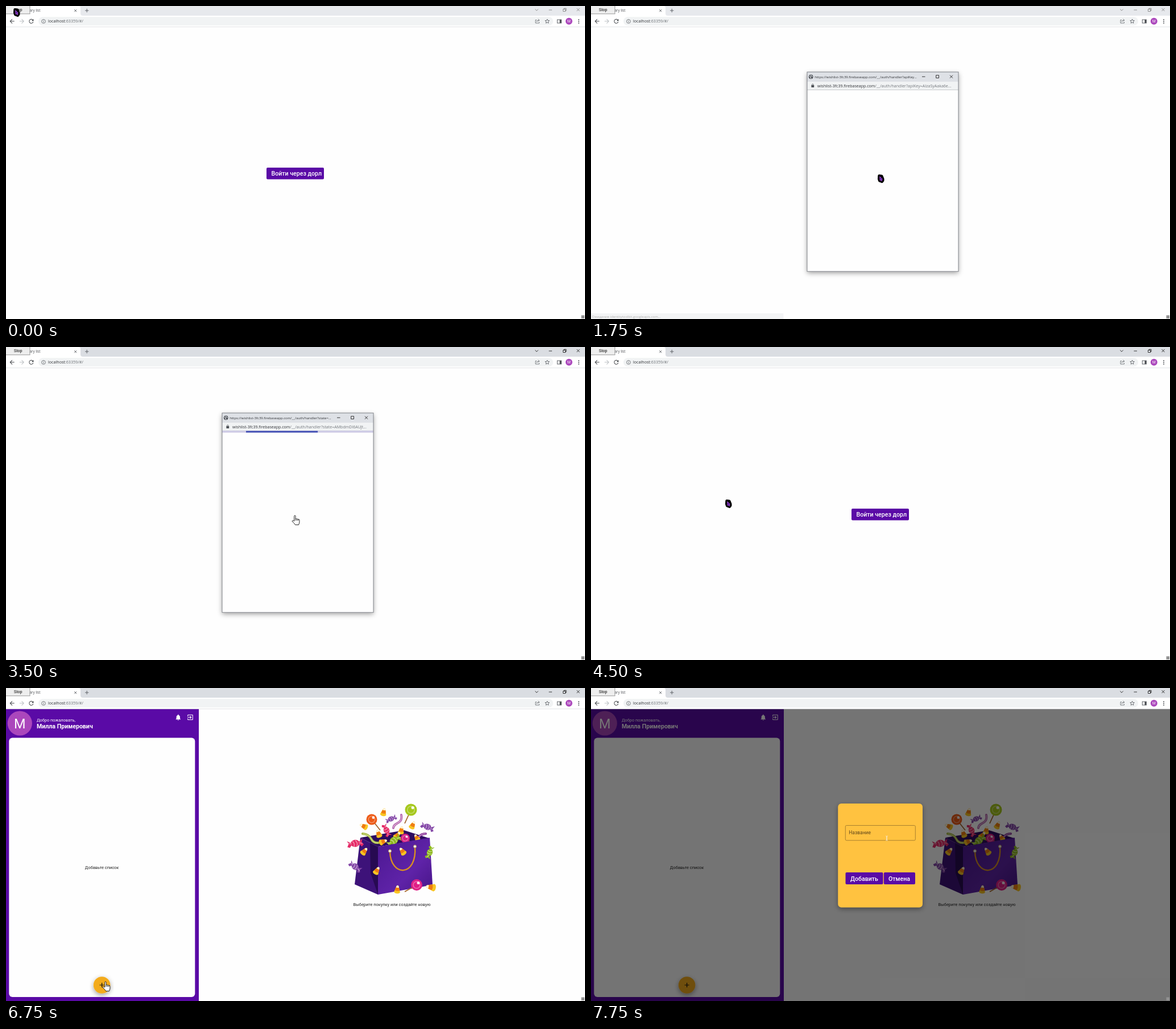
These frames come from a looping animation (1018 by 550 pixels, 8 s). An HTML page:

```html
<!DOCTYPE html>
<html lang="ru">
<head>
<meta charset="utf-8">
<title>List</title>
<style>
html, body { margin: 0; width: 100%; height: 100%; overflow: hidden; background: #fff; }
svg { display: block; width: 1018px; height: 550px; }
text { font: 7.42px Roboto, sans-serif; white-space: pre; }
.ui { font-family: "Open Sans", "Noto Sans", sans-serif; }
.btn { font-size: 10.6px; font-weight: 500; fill: #fff; }
.line { fill: none; stroke: #5f6368; }
.purple { fill: #5a0aa6; }
</style>
</head>
<body>
<svg viewBox="0 0 1018 550">
  <defs>
    <filter id="shadow" x="-20%" y="-20%" width="140%" height="140%">
      <feDropShadow dx="0" dy="3" stdDeviation="4" flood-opacity=".38"/>
    </filter>
    <linearGradient id="front" x2="1" y2="1">
      <stop stop-color="#4b1791"/><stop offset=".6" stop-color="#5f23a8"/><stop offset="1" stop-color="#461487"/>
    </linearGradient>
    <g id="corn">
      <path d="M0-8Q2-8 3-4L6 5Q5 8 0 8T-6 5L-3-4Q-2-8 0-8" fill="#f9c623"/>
      <path d="M-4.6 2L-3-4H3L4.6 2Q0 4-4.6 2" fill="#ef7d12"/>
      <path d="M-3-4Q-2-8 0-8T3-4Q0-3-3-4" fill="#fff3d6"/>
    </g>
    <g id="sweet">
      <path d="M-5 0L-13-6-11-1-14 4-10 6ZM5 0L13-6 11 0 14 4 10 7Z"/>
      <ellipse rx="7.5" ry="6"/>
      <path d="M-4-4Q0 0-3 5M1-5Q5 0 2 5M-6 0L-12-2M6 0L12 2" fill="none" stroke="#fff" stroke-opacity=".5" stroke-width="1.3"/>
    </g>
  </defs>

  <rect width="1018" height="550" fill="#fefefe"/>

  <g id="login">
    <rect class="purple" x="458" y="284" width="101" height="20.5" rx="2"/>
    <text class="btn" x="466.5" y="298">Войти через дорл</text>
  </g>

  <g id="home">
    <rect class="purple" y="37" width="339" height="513"/>
    <circle cx="24.3" cy="62" r="21.6" fill="#ab47bc"/>
    <text x="24.3" y="70.7" text-anchor="middle" fill="#fff" style="font-size:23.5px">M</text>
    <text x="54" y="59" fill="#fff">Добро пожаловать,</text>
    <text x="54" y="71" fill="#fff" style="font-size:10.6px;font-weight:700">Милла Примерович</text>
    <path transform="translate(296.4 45.2) scale(.53)" fill="#fff" d="M12 22c1.1 0 2-.9 2-2h-4c0 1.1.89 2 2 2zm6-6v-5c0-3.07-1.64-5.64-4.5-6.32V4c0-.83-.67-1.5-1.5-1.5s-1.5.67-1.5 1.5v.68C7.63 5.36 6 7.92 6 11v5l-2 2v1h16v-1l-2-2z"/>
    <path transform="translate(317.6 45.2) scale(.53)" fill="#fff" d="M10.09 15.59L11.5 17l5-5-5-5-1.41 1.41L12.67 11H3v2h9.67zM19 3H5c-1.11 0-2 .9-2 2v4h2V5h14v14H5v-4H3v4c0 1.1.89 2 2 2h14c1.1 0 2-.9 2-2V5c0-1.1-.9-2-2-2z"/>
    <rect x="5.3" y="87.5" width="327" height="455.5" rx="6" fill="#fefefe"/>
    <text x="168.6" y="318.3" text-anchor="middle" fill="#222">Добавьте список</text>
    <circle cx="168.6" cy="522" r="14.8" fill="#f3ab1c" filter="url(#shadow)"/>
    <path d="M164.6 522h8M168.6 518v8" stroke="#111" stroke-width="1.2"/>
    <text x="678.5" y="383" text-anchor="middle" fill="#222">Выберите покупку или создайте новую</text>
    <g id="bag">
      <path d="M623 263L700 250 744 264 654 279Z" fill="#2d0b60"/>
      <g id="filling"></g>
      <path d="M623 263L654 279V363L613 345Z" fill="#3d1279"/>
      <path d="M640 272L654 279V363L641 325Z" fill="#270a52"/>
      <path d="M654 279L745 263 750 346 654 363Z" fill="url(#front)"/>
      <path d="M675 287C676 333 723 332 719 279" fill="none" stroke="#d99022" stroke-width="2.4"/>
      <g fill="#eee" stroke="#a77a58"><circle cx="675" cy="286.500" r="2.700"/><circle cx="719" cy="278.500" r="2.700"/></g>
      <g id="scatter"></g>
    </g>
  </g>

  <g id="dialog">
    <rect y="37" width="1018" height="513" fill-opacity=".54"/>
    <rect x="434.3" y="203" width="148.700" height="182.500" rx="6" fill="#ffc23f" filter="url(#shadow)"/>
    <rect x="447.3" y="241.500" width="123" height="26.300" rx="2" fill="none" stroke="#94702a" stroke-width=".8"/>
    <text x="453.3" y="257" fill="#5f481a" style="font-size:8.48px">Название</text>
    <rect class="purple" x="447.500" y="324" width="66" height="21" rx="2"/>
    <rect class="purple" x="514.800" y="324" width="55.200" height="21" rx="2"/>
    <text class="btn" x="456" y="338.500">Добавить</text>
    <text class="btn" x="523" y="338.500">Отмена</text>
  </g>

  <rect x="1011.500" y="543.500" width="5.500" height="5.500" fill="#929292"/>

  <g id="status">
    <rect y="540" width="338.500" height="10" fill="#f3f4f5"/>
    <text class="ui" x="1.500" y="548" fill="#adadad" style="font-size:6px">Ожидание identitytoolkit.googleapis.com...</text>
  </g>

  <g id="browser">
    <rect id="strip" width="1018" height="17"/>
    <path d="M0 0H128Q131 0 131 3V13Q131 17 135 17H0Z" fill="#fff"/>
    <rect y="17" width="1018" height="19.500" fill="#fff"/>
    <path d="M0 36.700H1018" stroke="#dcdee1" stroke-width=".8"/>
    <rect x="57" y="19.300" width="905" height="15" rx="7.500" fill="#f1f3f4"/>
    <text class="ui" x="41.500" y="10.300" fill="#4a4d51" style="font-size:6.2px">ary list</text>
    <path class="line" d="M120.200 6.200l4 4m0-4l-4 4M139 8h6.400m-3.200-3.200v6.400"/>
    <rect x="-1" y="-1" width="43" height="14.800" fill="#eee" stroke="#999"/>
    <text x="13.700" y="9.300" style="font-family:'Liberation Sans',sans-serif;font-size:7.2px">Stop</text>
    <g fill="#45484c">
      <path transform="translate(4.500 20.700) scale(.51)" d="M20 11H7.83l5.59-5.59L12 4l-8 8 8 8 1.410-1.410L7.830 13H20z"/>
      <path transform="translate(34 20.700) scale(-.51 .51)" fill="#bdc0c4" d="M20 11H7.830l5.590-5.590L12 4l-8 8 8 8 1.410-1.410L7.830 13H20z"/>
      <path transform="translate(38.300 20.700) scale(.51)" d="M17.650 6.350C16.200 4.900 14.210 4 12 4c-4.420 0-7.990 3.580-7.990 8s3.570 8 7.990 8c3.730 0 6.840-2.550 7.730-6h-2.080c-.820 2.330-3.040 4-5.650 4-3.310 0-6-2.690-6-6s2.690-6 6-6c1.660 0 3.140.690 4.220 1.780L13 11h7V4z"/>
      <circle cx="1007" cy="24" r=".9"/><circle cx="1007" cy="27" r=".9"/><circle cx="1007" cy="30" r=".9"/>
      <path d="M973.500 24h3v6h-3z"/>
    </g>
    <circle class="line" cx="66" cy="27" r="3.400" stroke-width=".8"/>
    <path class="line" d="M66 26.300v2.700M66 24.500v1M933 24.500h-2v5.500h6.500v-2M933 28q0-3 4-3m-1.500-2l2.500 2-2.500 2" stroke-width=".8"/>
    <path class="line" d="M951.600 23l1.100 2.500 2.700.200-2.100 1.800.700 2.700-2.400-1.400-2.400 1.400.700-2.700-2.100-1.800 2.700-.200z" stroke-width=".9"/>
    <rect class="line" x="969.300" y="24" width="7" height="6" stroke-width="1"/>
    <text class="ui" x="74" y="29.400" fill="#6b6f74" style="font-size:7.130px"><tspan fill="#303236">localhost</tspan>:63359/#/</text>
    <circle cx="989.800" cy="26.800" r="6" fill="#ab47bc"/>
    <text x="989.800" y="29.200" text-anchor="middle" fill="#fff" style="font-size:6.500px">M</text>
    <path id="controls" fill="none" stroke-width=".9" d="M930.300 5.500l2.700 2.700 2.700-2.700M954.500 7h5.500M979.500 5.500h4v4h-4zM981 5.500v-1.300h4v4h-1.300M1003.500 4l5 5m0-5l-5 5"/>
  </g>

  <g id="popup">
    <rect x="380" y="116" width="266" height="350.300" fill="#fefefe" filter="url(#shadow)"/>
    <path d="M380 116h266v17h-266z" fill="#dee1e6"/>
    <path d="M380 133h266v14h-266z" fill="#f1f3f4"/>
    <path d="M380 147.300h266" stroke="#b9bbbe" stroke-width=".8"/>
    <circle cx="386.700" cy="124.300" r="3.900" fill="#50545a"/>
    <path d="M383.700 123q2 0 2 2t2 2M386.500 121.200q0 2 3 2.500" fill="none" stroke="#dee1e6" stroke-width="1.100"/>
    <text id="title" class="ui" x="393.300" y="126.600" fill="#303236" style="font-size:6.020px"></text>
    <path d="M582 124.200h5.500M606.700 121.700h4.800v4.800h-4.800zM631 121.700l5 5m0-5l-5 5" fill="none" stroke="#222" stroke-width=".9"/>
    <rect x="387.400" y="139" width="4.800" height="4" rx=".5" fill="#4d5156"/>
    <path d="M388.500 139v-1.200q1.300-2 2.600 0v1.200" fill="none" stroke="#4d5156" stroke-width=".8"/>
    <text class="ui" x="398" y="142.500" fill="#74787d" style="font-size:7.060px"><tspan fill="#303236">wishlist-3fc39.firebaseapp.com</tspan><tspan id="path"></tspan></text>
    <g id="progress">
      <path d="M380 147h266v3.500h-266z" fill="#cfcce6"/>
      <rect id="bar" y="147.500" height="2.800" fill="#3f4db3"/>
    </g>
    <rect x="380" y="116" width="266" height="350.300" fill="none" stroke="#777a80" stroke-width=".9"/>
  </g>

  <g id="arrow">
    <path d="M2.800 2.500L7 3 9 8V10.500L7.500 12.500 3.500 11 2.500 8Z" stroke="#000" stroke-width="5" stroke-linejoin="round"/>
    <path d="M3.800 3.800L8.300 8.300 6.700 8.700 7.800 11 6.700 11.400 5.700 9.300 4.200 10.500Z" fill="#4c1590" stroke="#b455f0" stroke-width=".9"/>
  </g>
  <path id="hand" fill="#fff" stroke="#111" stroke-width=".9" stroke-linejoin="round" d="M2.700 10V1.400Q2.700 0 3.900 0T5.100 1.400V6Q6.300 4.800 7.500 6.300 8.700 5.200 9.700 6.800 11.900 6 11.900 8.500V12Q11.500 14 10.500 16.500H4.500Q3.500 14-1 10.300-.500 7.700 2.700 10M5.100 6v3M7.500 6.300v2.700M9.700 6.800v2.400"/>
  <path id="beam" fill="none" stroke="#f6ead0" stroke-width=".9" d="M-1.800-4Q0-4 0-3V3Q0 4-1.800 4M1.800-4Q0-4 0-3V3Q0 4 1.800 4"/>
</svg>
<script>
const $ = id => document.getElementById(id);
const show = (id, on) => $(id).style.display = on ? '' : 'none';

const piece = (kind, x, y, turn, size, color = '') =>
  `<use href="#${kind}" fill="${color}" transform="translate(${x} ${y}) rotate(${turn}) scale(${size})"/>`;
const corn = (x, y, turn, size = .9) => piece('corn', x, y, turn, size);
const sweet = (x, y, turn, color, size = .9) => piece('sweet', x, y, turn, size, color);
const lolly = (x, y, r, color, dx, dy) =>
  `<path d="M${x} ${y}l${dx} ${dy}" stroke="#a5652b" stroke-width="1.800"/>
   <circle cx="${x}" cy="${y}" r="${r}" fill="${color}"/>
   <circle cx="${x}" cy="${y}" r="${r * .6}" fill="none" stroke="#fff" stroke-opacity=".35" stroke-width="1.500"/>
   <circle cx="${x + r * .3}" cy="${y - r * .35}" r="${r * .25}" fill="#fff" opacity=".9"/>`;
const worm = (d, color) =>
  `<path d="${d}" fill="none" stroke="${color}" stroke-width="4" stroke-linecap="round"/>
   <path d="${d}" fill="none" stroke="#fff" stroke-opacity=".5" stroke-width="1.200"/>`;

const violet = '#8549a8', pink = '#e52c68', green = '#8fb91f';
$('filling').innerHTML =
  worm('M681 246C682 235 698 240 695 223', '#b565ad') + worm('M627 256Q638 257 642 265T655 272', '#a4b83b') +
  worm('M722 268Q727 256 738 256', '#8f3c9c') +
  lolly(643, 231, 9.5, '#ed5a16', 15, 19) + lolly(712, 214, 10.5, '#a6c81d', -11, 24) +
  corn(664, 218, 12) + corn(629, 243, -65) + corn(715, 241, 25) + corn(655, 256, -20) +
  corn(663, 270, 70) + corn(695, 250, 10) + corn(688, 259, 40) +
  sweet(677, 230, -25, violet, .75) + sweet(669, 250, 65, pink, .85) +
  sweet(682, 268, -35, green, 1.05) + lolly(702, 264, 8, '#d51d81', 8, 6) + corn(722, 263, -30, .8);
$('scatter').innerHTML =
  sweet(741, 244, 20, violet) + sweet(614, 273, -10, pink, 1.05) + sweet(745, 289, 110, green, .85) +
  sweet(614, 314, 35, violet) + corn(630, 287, 40) + corn(697, 287, -35) + corn(652, 321, 30) +
  corn(688, 354, 5) + corn(747, 350, -80, 1.1) + lolly(722, 346, 10, '#e01f86', -21, 12);

// Pointer stops: time, x, y
const stops = [[0, 13, 4], [1000, 504, 296], [3750, 504, 296], [4500, 236, 268],
  [5250, 236, 268], [6500, 171, 516], [7000, 171, 516], [7750, 520, 264]];

function pointerAt(t) {
  const i = stops.findLastIndex(s => s[0] <= t);
  const a = stops[i], b = stops[i + 1] || a;
  const k = b === a ? 0 : (t - a[0]) / (b[0] - a[0]);
  const ease = k * k * (3 - 2 * k);
  return [1, 2].map(n => a[n] + (b[n] - a[n]) * ease);
}

function draw(now) {
  const t = Math.floor(now % 8000 / 250) * 250;
  const within = (from, to) => t >= from && t < to;

  const active = within(1250, 1500) || t >= 3500;
  $('strip').setAttribute('fill', active ? '#dadde2' : '#e7e9ed');
  $('controls').setAttribute('stroke', active ? '#222' : '#888');

  show('login', t < 4750);
  show('home', t >= 4750);
  show('bag', t >= 5500);
  show('dialog', t >= 7000);
  show('status', within(1750, 2250));
  show('popup', within(1500, 3750));

  const returned = t >= 3000;
  const page = '/__/auth/handler?';
  $('title').textContent = 'https://wishlist-3fc39.firebaseapp.com' + page + (returned ? 'state=...' : 'apiKey...');
  $('path').textContent = page + (returned ? 'state=AMbdmDl6AUJt...' : 'apiKey=AIzaSyAaka6e...');
  show('progress', returned);
  // Indeterminate bar: grows to 25%..100%, then leaves on the right
  const phase = Math.max(0, t - 2868) / 2000;
  const left = phase < .5 ? phase / 2 : .25 + (phase - .5) * 3;
  const right = Math.min(1, phase * 2);
  $('bar').setAttribute('x', 380 + 266 * left);
  $('bar').setAttribute('width', 266 * Math.max(0, right - left));

  const [x, y] = pointerAt(t);
  const kind = t >= 7750 ? 'beam'
    : within(1000, 1750) || within(3000, 4000) || within(6500, 7000) ? 'hand' : 'arrow';
  for (const id of ['arrow', 'hand', 'beam']) show(id, id === kind);
  $(kind).setAttribute('transform', `translate(${x} ${y})`);
  requestAnimationFrame(draw);
}
requestAnimationFrame(draw);
</script>
</body>
</html>
```
